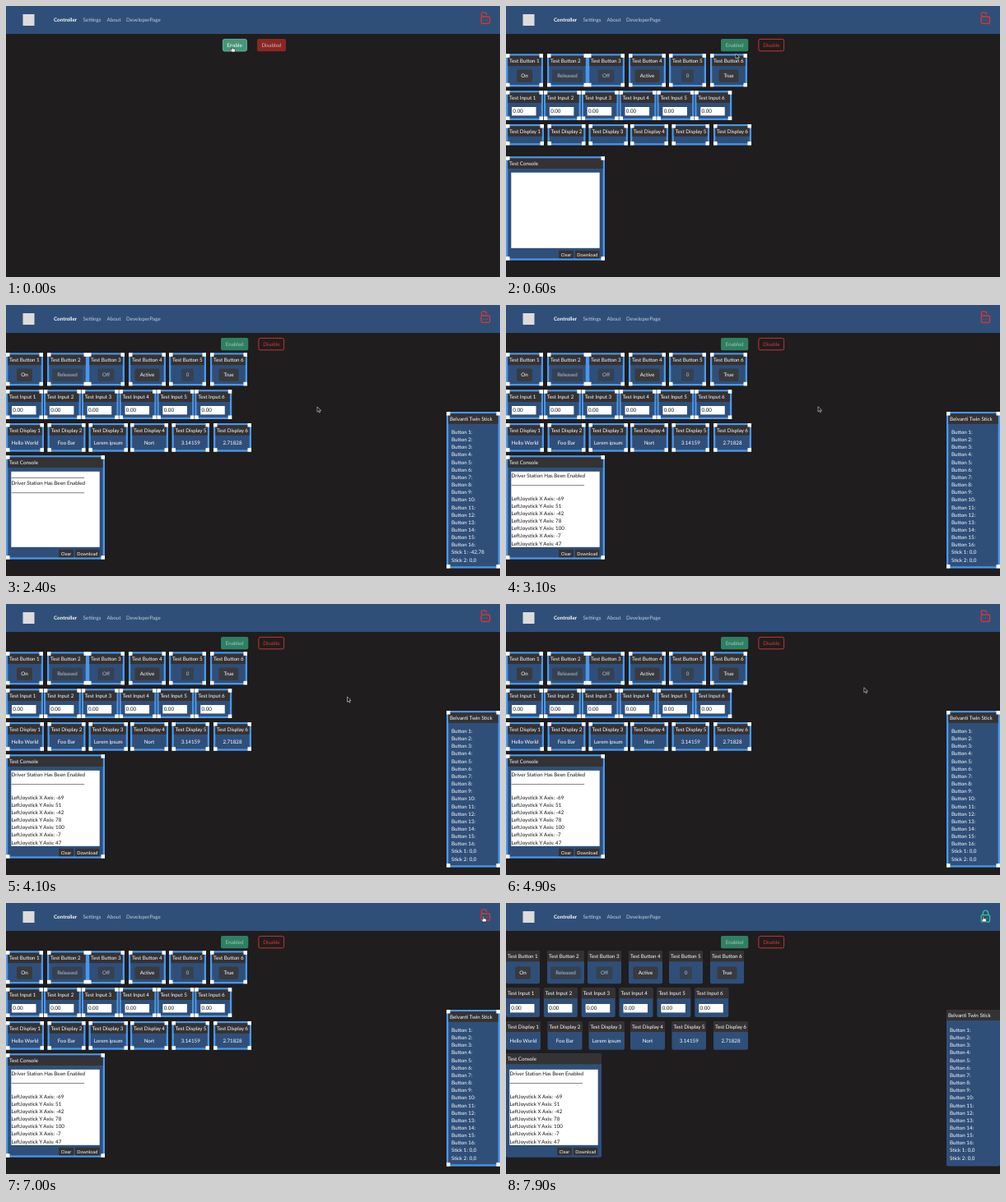
These frames come from a looping animation (600x330 px, 8000 ms). An HTML page:

```html
<!DOCTYPE html>
<html lang="en">
<head>
<meta charset="utf-8">
<title>Controller</title>
<style>
  html, body { margin: 0; width: 100%; height: 100%; overflow: hidden; background: #1f1d1e; }
  svg { display: block; font: 6.25px Lato, sans-serif; text-rendering: geometricPrecision; white-space: pre; }
</style>
</head>
<body>
<svg id="stage" width="600" height="330" viewBox="0 0 600 330"></svg>
<script>
const LOOP = 8000, STEP = 100;
const ENABLE = 300, DISPLAY = 800, PAD = 2200, LOCK = 7100;
const BLUE = '#2f4f79', HEAD = '#343233', EDGE = '#4a97ea', RED = '#d9382f', GREEN = '#36c39c';
const ROW = 9.15;

// Widgets: [x, inner width, content, button width, muted]
const buttons = [
  [0, 41, 'On', 19], [50, 45, 'Released', 37, 1], [99, 41, 'Off', 20, 1],
  [149, 41, 'Active', 30], [198, 41, '0', 15, 1], [248, 41, 'True', 24]
];
const displays = [
  [0, 42, 'Hello World'], [50.5, 42, 'Foo Bar'], [100.5, 43.5, 'Lorem ipsum'],
  [151, 42, 'Nort'], [201.5, 41.5, '3.14159'], [252, 42, '2.71828']
];
// Console messages: [time, axis, value]
const moves = [
  [2500, 'X', -69], [2500, 'Y', 51], [2700, 'X', -42], [2700, 'Y', 78],
  [2800, 'Y', 100], [3000, 'X', -7], [3000, 'Y', 47]
];
const sticks = [[2200, '-69,51'], [2400, '-42,78'], [2600, '-42,100'], [2800, '-7,47'], [3000, '0,0']];
// Pointer path: [time, x, y]
const path = [
  [0, 275, 49], [300, 275, 49], [600, 279, 58], [1200, 300, 74], [2000, 378, 124],
  [3000, 378, 124], [4000, 414.5, 113], [4700, 414.5, 113], [5600, 575.5, 23],
  [6300, 575.5, 23], [6800, 580, 16], [LOOP, 580, 16]
];

const rect = (x, y, w, h, fill, r = 0, more = '') =>
  `<rect x="${x}" y="${y}" width="${w}" height="${h}" rx="${r}" fill="${fill}" ${more}/>`;

// y is the middle of the capitals
const text = (x, y, s, fill = '#fff', more = '') =>
  `<text x="${x}" y="${y + 2.2}" fill="${fill}" ${more}>${s}</text>`;

const mid = (x, y, s, fill, more = '') => text(x, y, s, fill, 'text-anchor="middle" ' + more);

function panel(x, y, w, h, title, edit) {
  if (!edit)
    return rect(x, y, w, h, BLUE, 2) +
      `<path d="M${x} ${y + 13}v-11q0-2 2-2h${w - 4}q2 0 2 2v11z" fill="${HEAD}"/>` +
      text(x + 2, y + 6.8, title);
  const W = w + 4, handle = 4.5;
  let s = rect(x, y, W, h, EDGE) + rect(x + 2.3, y + 2.3, W - 4.6, h - 4.6, BLUE) +
    rect(x + 2.3, y + 2.3, W - 4.6, 12.5, HEAD);
  for (const cx of [x, x + W - handle])
    for (const cy of [y, y + h - handle]) s += rect(cx, cy, handle, handle, '#fff');
  return s + text(x + 4, y + 8.8, title);
}

function header(t) {
  let s = rect(0, 0, 600, 34, BLUE) + rect(20.5, 10, 14, 14, '#dcdcdc') +
    text(58, 17, 'Controller', '#fff', 'font-weight="bold"');
  [[93.5, 'Settings'], [122.5, 'About'], [146, 'DeveloperPage']]
    .forEach(([x, label]) => s += text(x, 17, label, '#c3ccd9'));
  return s + (t < ENABLE
    ? rect(263.4, 40.4, 29, 14.6, '#45977a', 2, 'stroke="#7fc0a8" stroke-width=".8"') + mid(277.5, 47.7, 'Enable') +
      rect(305, 40, 35, 15.2, '#8b2723', 2) + mid(322.3, 47.7, 'Disabled', '#d0b4b2')
    : rect(261, 40, 33.3, 15.2, '#2f7f63', 2) + mid(277.6, 47.7, 'Enabled', '#a3c6b9') +
      rect(306.9, 40.4, 30.7, 14.4, 'none', 2, `stroke="${RED}" stroke-width=".9"`) + mid(322.3, 47.7, 'Disable', RED)) +
    padlock(t >= LOCK);
}

function padlock(closed) {
  const color = closed ? GREEN : RED;
  const y = closed ? 14.6 : 13;
  const shackle = closed ? 'M579.4 14.6v-2.4a3.1 3.1 0 0 1 6.2 0v2.4'
    : 'M578.6 13C576 9.5 577.6 7.6 580 7.6c2 0 3.4 1 4 3';
  return `<g fill="none" stroke="${color}" stroke-width="1.3">` +
    rect(577.2, y, 10.4, 8.4, 'none', 1.3) + `<path d="${shackle}"/></g>` +
    [580.2, 582.4, 584.6].map(x => rect(x - .5, y + 3.7, 1, 1, color)).join('');
}

function messages(t, x) {
  if (t < DISPLAY) return '';
  const rows = ['_', 'Driver Station Has Been Enabled', '_'];
  const sent = moves.filter(m => t >= m[0]);
  if (sent.length) rows.push('', ...sent.map(m => `LeftJoystick ${m[1]} Axis: ${m[2]}`));
  const skip = Math.max(0, rows.length - 10);
  return rows.slice(skip).map((row, i) => {
    const y = 208 + i * ROW;
    return row === '_' ? rect(x, y + 2.2, 88.5, .6, '#333') : text(x, y, row, '#111');
  }).join('');
}

function widgets(t) {
  const edit = t < LOCK, dx = edit ? 2 : 0;
  let s = '';
  buttons.forEach(([x, w, label, bw, muted], i) => {
    const cx = x + w / 2 + dx;
    s += panel(x, 58.3, w, 40, 'Test Button ' + (i + 1), edit) +
      `<g opacity="${muted ? .65 : 1}">` + rect(cx - bw / 2, 77.5, bw, 15.2, '#393a3d', 2) +
      mid(cx, 85, label) + '</g>';
  });
  for (let i = 0; i < 6; i++) {
    const x = i * 45.85;
    s += panel(x, 103.2, 41, 35.8, 'Test Input ' + (i + 1), edit) +
      rect(x + 5 + dx, 123, 29.5, 10.4, '#fff') + text(x + 6.3 + dx, 128, '0.00', '#111');
  }
  const full = t >= DISPLAY;
  displays.forEach(([x, w, value], i) => {
    s += panel(x, 144, w, full ? 34.7 : 25.5, 'Test Display ' + (i + 1), edit);
    if (full) s += mid(x + w / 2 + dx, 168, value);
  });
  s += panel(0, 183.2, 116, 126.5, 'Test Console', edit) + rect(4.3 + dx, 202.8, 107.4, 92, '#fff') +
    messages(t, 4.6 + dx);
  [[62, 18, 'Clear'], [82, 29.5, 'Download']].forEach(([x, w, label]) =>
    s += rect(x + dx, 297.8, w, 9.4, HEAD, 1) + mid(x + w / 2 + dx, 302.4, label, '#fff', 'font-size="5.55"'));
  return s;
}

function gamepad(t) {
  if (t < PAD) return '';
  const edit = t < LOCK, x = edit ? 541 : 539;
  const rows = Array.from({ length: 16 }, (_, i) => `Button ${i + 1}:`);
  rows.push('Stick 1: ' + sticks.filter(k => t >= k[0]).pop()[1], 'Stick 2: 0,0');
  return panel(535, 130, edit ? 61 : 65, 190.6, 'Belvanti Twin Stick', edit) +
    rows.map((row, i) => text(x, 154.8 + i * ROW, row)).join('');
}

function pointer(t) {
  const i = path.findIndex(p => p[0] > t);
  const [t0, x0, y0] = path[i - 1], [t1, x1, y1] = path[i];
  const u = (t - t0) / (t1 - t0), k = u * u * (3 - 2 * u);
  const hand = t < 500 || t >= 6600;
  const d = hand
    ? 'M-.8.7q.8-1.2 1.5 0v2.2l2 .4q1 .3.9 1.3l-.5 2.4h-3.8l-2-2.6q.3-1.3 1.9-.2z'
    : 'M0 0v6.2l1.5-1.3 1 2.2 1.1-.5-1-2.1h2z';
  return `<path transform="translate(${x0 + (x1 - x0) * k} ${y0 + (y1 - y0) * k})" d="${d}" ` +
    (hand ? 'fill="#fff" stroke="#111"' : 'fill="#111" stroke="#ddd"') + ' stroke-width=".6"/>';
}

const stage = document.getElementById('stage');
let last = -1;
function frame(now) {
  const t = Math.floor(now % LOOP / STEP) * STEP;
  if (t !== last) {
    stage.innerHTML = header(t) + (t >= ENABLE ? widgets(t) : '') + gamepad(t) + pointer(t);
    last = t;
  }
  requestAnimationFrame(frame);
}
const start = performance.now();
const tick = () => { frameAt(); requestAnimationFrame(tick); };
function frameAt() {
  const t = Math.floor((performance.now() - start) % LOOP / STEP) * STEP;
  if (t === last) return;
  last = t;
  stage.innerHTML = header(t) + (t >= ENABLE ? widgets(t) : '') + gamepad(t) + pointer(t);
}
tick();
</script>
</body>
</html>
```
